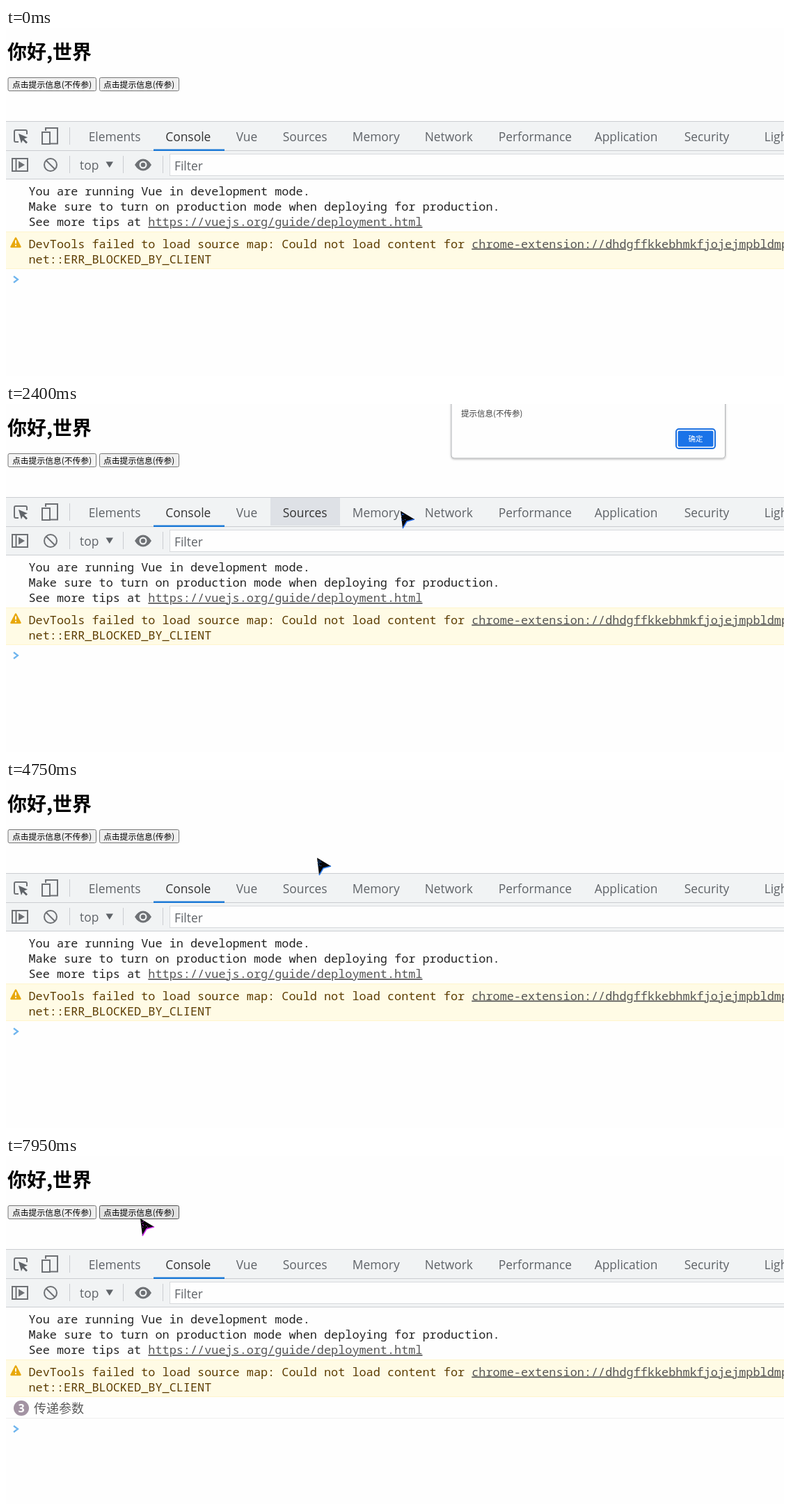
An HTML page that plays this animation: 1118 by 501 pixels, repeating every 8000 ms.

```html
<!DOCTYPE html>
<html lang="zh">
<head>
<meta charset="utf-8">
<title>Console demo</title>
<style>
html, body { margin: 0; width: 100%; height: 100%; overflow: hidden; background: #fefefe; }
svg { display: block; width: 1118px; height: 501px; }
text { white-space: pre; }
.cjk { font-family: "Noto Sans CJK SC", "Noto Sans CJK", sans-serif; }
.ui { font: 17.4px "Open Sans", "Noto Sans", sans-serif; fill: #5f6368; }
.ui.dark { fill: #333; }
.mono { font: 16.85px "Noto Sans Mono", "DejaVu Sans Mono", monospace; fill: #222; }
.warn { fill: #5c3c00; }
.link { fill: #545454; text-decoration: underline; }
.line { fill: none; stroke: #6e7175; stroke-width: 2; }
.rule { stroke: #cbcdd1; }
.btn rect { fill: #efefef; stroke: #767676; }
.btn.hover rect { fill: #e3e3e3; stroke: #505050; }
.btn.held rect { fill: #f4f4f4; }
.btn text { font-size: 11.8px; }
</style>
</head>
<body>
<svg viewBox="0 0 1118 501">
  <defs>
    <filter id="shadow" x="-5%" y="-20%" width="110%" height="150%">
      <feDropShadow dx="0" dy="1" stdDeviation="1.5" flood-color="#000" flood-opacity=".3"/>
    </filter>
  </defs>
  <rect width="1118" height="501" fill="#fefefe"/>

  <text class="cjk" x="2" y="45" font-size="28" font-weight="700">你好,世界</text>
  <g class="btn cjk" id="plain">
    <rect x="3" y="71.5" width="126.5" height="19" rx="2"/>
    <text x="9" y="86">点击提示信息(不传参)</text>
  </g>
  <g class="btn cjk" id="param">
    <rect x="134.5" y="71.5" width="114" height="19" rx="2"/>
    <text x="140" y="86">点击提示信息(传参)</text>
  </g>

  <!-- panel bars -->
  <rect y="134" width="1118" height="84" fill="#f1f3f4"/>
  <path class="rule" d="M0 134.5H1118M0 176.5H1118M0 217.5H1118M91.5 143V168M91.5 184V209M168.5 184V209M225.5 184V209"/>
  <rect id="tabHover" y="135" height="40" fill="#dee1e6"/>
  <rect x="212" y="174.500" width="102" height="2.500" fill="#1a78d6"/>
  <g id="tabs"></g>

  <!-- toolbar icons -->
  <path class="line" d="M18 164H14Q12 164 12 162V149Q12 147 14 147H28Q30 147 30 149V153"/>
  <path d="M18 152L31 157.500L26 159.500L31 164.500L29 166.500L24 161.500L22 166Z" fill="#5f6368"/>
  <path class="line" d="M57 148V144H74V166.500H64M52 150H63V167H52Z"/>
  <path class="line" d="M9 188H31V206H9ZM14.500 188V206"/>
  <path d="M18 191.500L27 197L18 202.500Z" fill="#6e7175"/>
  <g class="line"><circle cx="64" cy="197" r="9"/><path d="M57.500 190.500L70.500 203.500"/></g>
  <text class="ui" x="106" y="204">top</text>
  <path d="M143.500 192.500H154L148.750 201Z" fill="#5f6368"/>
  <path d="M185 197Q190 188.500 197 188.500T209 197Q204 205.500 197 205.500T185 197Z" fill="#6e7175"/>
  <circle cx="197" cy="197" r="5.500" fill="#f1f3f4"/>
  <circle cx="197" cy="197" r="3.300" fill="#6e7175"/>
  <rect x="235.500" y="181.500" width="900" height="31" fill="#fefefe" stroke="#d8dadd"/>
  <text class="ui" x="242" y="204.500">Filter</text>

  <!-- console output -->
  <g class="mono">
    <text x="32.500" y="241">You are running Vue in development mode.</text>
    <text x="32.500" y="263">Make sure to turn on production mode when deploying for production.</text>
    <text x="32.500" y="285">See more tips at <tspan class="link">https://vuejs.org/guide/deployment.html</tspan></text>
  </g>
  <rect y="293" width="1118" height="54" fill="#fffbe5"/>
  <path d="M0 293.500H1118M0 346.500H1118" stroke="#fff5cc"/>
  <path d="M14 302.500L20.500 315H7.500Z" fill="#e8a80c" stroke="#e8a80c" stroke-width="2.500" stroke-linejoin="round"/>
  <path d="M14 305.500V310.500M14 312.300V314.300" stroke="#fff" stroke-width="1.800"/>
  <g class="mono">
    <text class="warn" x="32.500" y="316.500">DevTools failed to load source map: Could not load content for <tspan class="link">chrome-extension://dhdgffkkebhmkfjojejmpbldmpobfkfo</tspan></text>
    <text class="warn" x="32.500" y="338.500">net::ERR_BLOCKED_BY_CLIENT</text>
  </g>
  <g id="log">
    <path d="M0 377.500H1118" stroke="#efefef"/>
    <text class="cjk" id="logText" y="370" font-size="18" font-weight="300" fill="#5a5a5a">传递参数</text>
    <g id="badge">
      <circle cx="22" cy="363" r="11" fill="#a393a3"/>
      <text id="count" x="22" y="369" text-anchor="middle" font-family="Open Sans, sans-serif" font-size="16" font-weight="700" fill="#fff"></text>
    </g>
  </g>
  <path id="prompt" d="M11 -4.500L17 0L11 4.500" fill="none" stroke="#6fb5ee" stroke-width="2.200"/>

  <!-- alert -->
  <g id="alert" class="cjk">
    <rect x="640" y="-20" width="393.500" height="98" rx="4" fill="#fefefe" stroke="#b4b6b9" filter="url(#shadow)"/>
    <text x="654" y="17.500" font-size="11.500" fill="#3c3c3c">提示信息(不传参)</text>
    <rect x="963" y="36" width="56" height="28" rx="4" fill="#fff" stroke="#1a6fe0" stroke-width="2"/>
    <rect x="965.500" y="38.500" width="51" height="23" rx="2" fill="#1a73e8"/>
    <text x="991" y="54" font-size="10.500" text-anchor="middle" fill="#fff">确定</text>
  </g>

  <g id="cursor">
    <path d="M0 0L20 12L9 15L3 25Z" fill="#060608"/>
    <path id="rim" d="M3 25L9 15L20 12" fill="none" stroke-width="1.500"/>
    <path id="specks" stroke-width="1"/>
  </g>
</svg>

<script>
const LOOP = 8000, STEP = 69.2, FIRST = 107;
const $ = id => document.getElementById(id);
const lerp = (a, b, k) => a + (b - a) * k;
const show = (id, on) => { $(id).style.display = on ? "" : "none"; };

// Pointer stops: screen update, x, y
const STOPS = [
  [0, 754, 464], [12, 64, 79], [28, 62, 81], [33, 567, 154], [36, 984, 72], [45, 990, 47], [47, 1002, 53],
  [59, 980, 80], [67, 447, 112], [72, 216, 83], [84, 213, 97], [96, 206, 79], [103, 206, 79], [113, 193, 90]
];
const ALERT_OPEN = 20, ALERT_CLOSE = 43;
const LOGGED = [77, 96, 110];

const TABS = Object.entries({
  Elements: 119, Console: 229.5, Vue: 331, Sources: 398, Memory: 498,
  Network: 602, Performance: 708, Application: 846, Security: 975, Lighthouse: 1090
});
const PAD = 18;
const tabLeft = i => i < TABS.length ? Math.round(TABS[i][1] - PAD) : 1118;
const tabs = TABS.map(([name, x]) => {
  const el = document.createElementNS("http://www.w3.org/2000/svg", "text");
  el.setAttribute("x", x - 0.3);
  el.setAttribute("y", 163);
  el.textContent = name;
  return $("tabs").appendChild(el);
});

function pointer(n) {
  const i = STOPS.findIndex(s => s[0] > n);
  const a = STOPS.at(i < 0 ? -1 : Math.max(i - 1, 0));
  const b = i < 0 ? a : STOPS[i];
  const k = a === b ? 0 : (n - a[0]) / (b[0] - a[0]);
  return [1, 2].map(c => Math.round(lerp(a[c], b[c], k)));
}

function hoveredTab([x, y]) {
  if (y < 135 || y > 175) return -1;
  return TABS.findIndex((_, i) => x >= tabLeft(i) && x < tabLeft(i + 1));
}

// Seeded sparkle inside the arrow
function sparkle(n) {
  let seed = n + 1, d = "";
  const rand = () => (seed = seed * 16807 % 2147483647) / 2147483647;
  for (let i = 0; i < 9; i++) {
    const y = 4 + Math.floor(rand() * 12);
    const x = 1 + Math.floor(rand() * y * 0.8);
    d += `M${x} ${y + 0.5}h1`;
  }
  return d;
}

function draw(time) {
  const n = Math.floor((time - FIRST) / STEP);
  const moving = n >= 0;
  const [x, y] = pointer(n);
  const open = n >= ALERT_OPEN && n < ALERT_CLOSE;
  const over = (l, r) => moving && !open && x >= l && x <= r && y >= 71 && y <= 91;

  show("cursor", moving);
  $("cursor").setAttribute("transform", `translate(${x} ${y})`);
  const tint = `hsl(${255 + 45 * Math.cos((n - 12) * 0.18)} 85% 55%)`;
  $("rim").setAttribute("stroke", tint);
  $("specks").setAttribute("stroke", tint);
  $("specks").setAttribute("d", sparkle(n));

  show("alert", open);
  $("plain").classList.toggle("hover", over(3, 130));
  $("plain").classList.toggle("held", open);
  $("param").classList.toggle("hover", over(134, 249));

  // Tab highlight trails the pointer by one update
  const tab = hoveredTab(pointer(n - 1));
  show("tabHover", tab >= 0);
  if (tab >= 0) {
    $("tabHover").setAttribute("x", tabLeft(tab));
    $("tabHover").setAttribute("width", tabLeft(tab + 1) - tabLeft(tab));
  }
  tabs.forEach((el, i) => el.setAttribute("class", i === 1 || i === tab ? "ui dark" : "ui"));

  const count = LOGGED.filter(s => s <= n).length;
  show("log", count > 0);
  show("badge", count > 1);
  $("count").textContent = count;
  $("logText").setAttribute("x", count > 1 ? 40 : 32);
  $("prompt").setAttribute("transform", `translate(0 ${count ? 393 : 362})`);
}

const begin = performance.now();
function frame() {
  draw((performance.now() - begin) % LOOP);
  requestAnimationFrame(frame);
}
frame();
</script>
</body>
</html>
```
